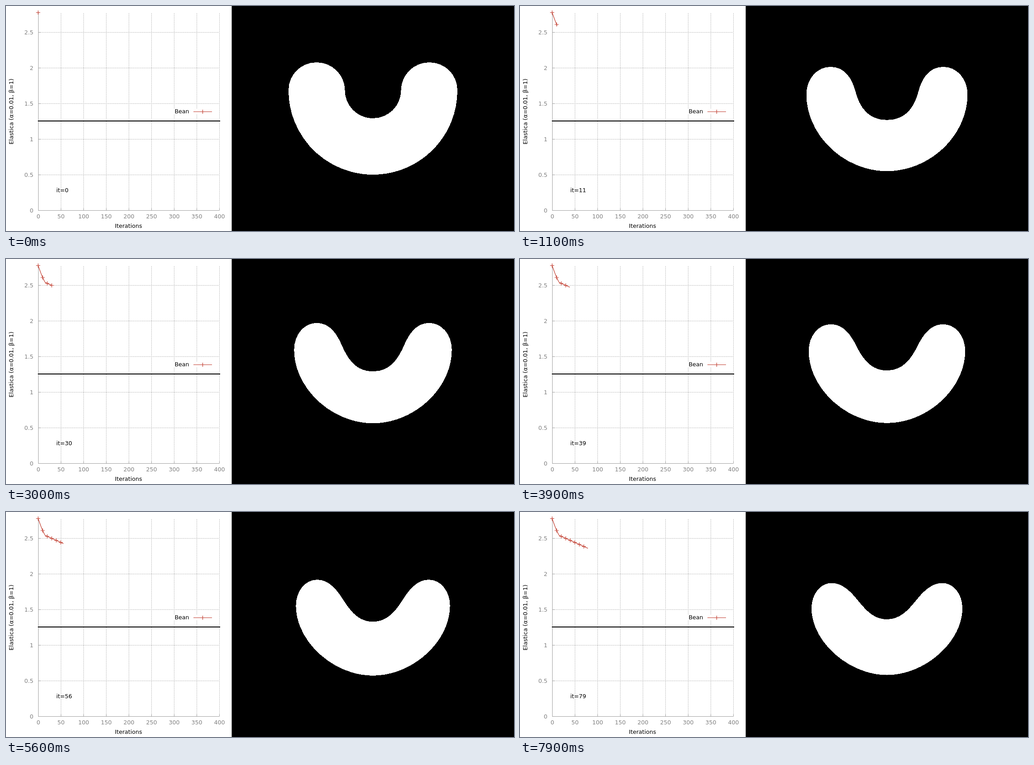
These frames come from a looping animation (1122x499 px, 8 s). An HTML page:

```html
<!DOCTYPE html>
<html lang="en">
<head>
<meta charset="utf-8">
<title>Elastica flow</title>
<style>
  html, body { margin: 0; width: 100%; height: 100%; overflow: hidden; background: #fff; }
  svg { display: block; width: 1122px; height: 499px; }
  text { font: 12.6px "DejaVu Sans", sans-serif; white-space: pre; }
  .tick { fill: #808080; }
  .mid { text-anchor: middle; }
  .end { text-anchor: end; }
  .grid { stroke: #909090; stroke-dasharray: 1 1.5; }
  .axis { stroke: #a0a0a0; fill: none; }
  .red { stroke: #c0392b; stroke-width: 1.2; fill: none; }
</style>
</head>
<body>
<svg viewBox="0 0 1122 499">
  <rect width="1122" height="499" fill="#fff"/>
  <g id="chart"></g>
  <rect x="366" y="228" width="96" height="12" fill="#fff"/>
  <text class="end" x="404.5" y="238">Bean</text>
  <path class="red" d="M414 234.5H455M434.5 230V239"/>
  <path d="M70.5 255H473" stroke="#000" stroke-width="2"/>
  <text class="mid" x="270.5" y="492">Iterations</text>
  <text class="mid" transform="translate(16 234) rotate(-90)" style="font-size:12.75px">Elastica (α=0.01, β=1)</text>
  <text id="count" x="111" y="413"></text>
  <path id="curve" class="red"/>
  <rect x="498.5" width="624" height="499" fill="#000"/>
  <path id="bean" fill="#fff" shape-rendering="crispEdges"/>
</svg>
<script>
const byId = id => document.getElementById(id);
const STEP = 100, COUNT = 80, CX = 810.5;

// Energy: a steady descent plus a steep start that fades out by iteration 16
const energyY = it => 45 + .45 * it - 30.5 * Math.max(0, 1 - it / 16) ** 1.3;

const mix = (a, b, p) => [a[0] + (b[0] - a[0]) * p, a[1] + (b[1] - a[1]) * p];

// Cubic segment whose end tangents both meet at the corner point
const arc = (from, corner, to, p, q) => [mix(from, corner, p), mix(to, corner, q), to];

function beanPath(it) {
  // Every measure relaxes quickly at first, then drifts evenly
  const quick = 1 - Math.exp(-it / 5), drift = it / (COUNT - 1);
  const flow = (start, a, b) => start + a * quick + b * drift;

  const inner = [CX, flow(249, 7.2, -18.2)];
  const bend = [flow(748.5, -10, 8.5), flow(187, 1, 9)];
  const top = [flow(686, -.6, 2.6), flow(125, 7.2, 25.3)];
  const left = [flow(624, 7.7, 12.2), flow(187, 7, 19.5)];
  const bottom = [CX, flow(374, -8, -4.5)];
  const slope = flow(0, .2, .61);
  const flat = flow(.552, .29, .11), steep = flow(.552, -.1, 0), outer = flow(.552, -.016, -.033);
  const tangentAt = y => [bend[0] + (y - bend[1]) * slope, y];

  const half = [inner,
    ...arc(inner, tangentAt(inner[1]), bend, flat, (steep + .552) / 2),
    ...arc(bend, tangentAt(top[1]), top, steep, flat),
    ...arc(top, [left[0], top[1]], left, .56, .56),
    ...arc(left, [left[0], bottom[1]], bottom, outer, outer)];
  const mirrored = half.slice(0, -1).reverse().map(([x, y]) => [2 * CX - x, y]);
  const [start, ...rest] = [...half, ...mirrored];
  return `M${start}C${rest.join(' ')}Z`;
}

function curvePath(it) {
  const points = Array.from({ length: it + 1 }, (_, i) => [71 + i, energyY(i)]);
  const marks = points.filter((_, i) => i % 10 === 0)
    .map(([x, y]) => `M${x - 4.5} ${y}h9M${x} ${y - 4.5}v9`);
  return `M${points.join('L')}${marks.join('')}`;
}

function drawChart() {
  let out = '';
  for (let k = 0; k <= 8; k++) {
    const x = 71.5 + 50 * k;
    if (k) out += `<path class="grid" d="M${x} 16V453"/>`;
    out += `<path class="axis" d="M${x} 453v-5"/><text class="tick mid" x="${x}" y="471">${50 * k}</text>`;
  }
  for (let k = 0; k <= 5; k++) {
    const y = 453.5 - 79 * k;
    if (k) out += `<path class="grid" d="M71 ${y}H471"/>`;
    out += `<path class="axis" d="M71 ${y}h5"/><text class="tick end" x="60.5" y="${y + 4}">${k / 2}</text>`;
  }
  byId('chart').innerHTML = out + '<path class="axis" d="M71.5 15V453.5H471.5"/>';
}

let shown = -1;
function frame() {
  const it = Math.floor(performance.now() / STEP) % COUNT;
  if (it !== shown) {
    shown = it;
    byId('count').textContent = 'it=' + it;
    byId('curve').setAttribute('d', curvePath(it));
    byId('bean').setAttribute('d', beanPath(it));
  }
  requestAnimationFrame(frame);
}

drawChart();
frame();
</script>
</body>
</html>
```
